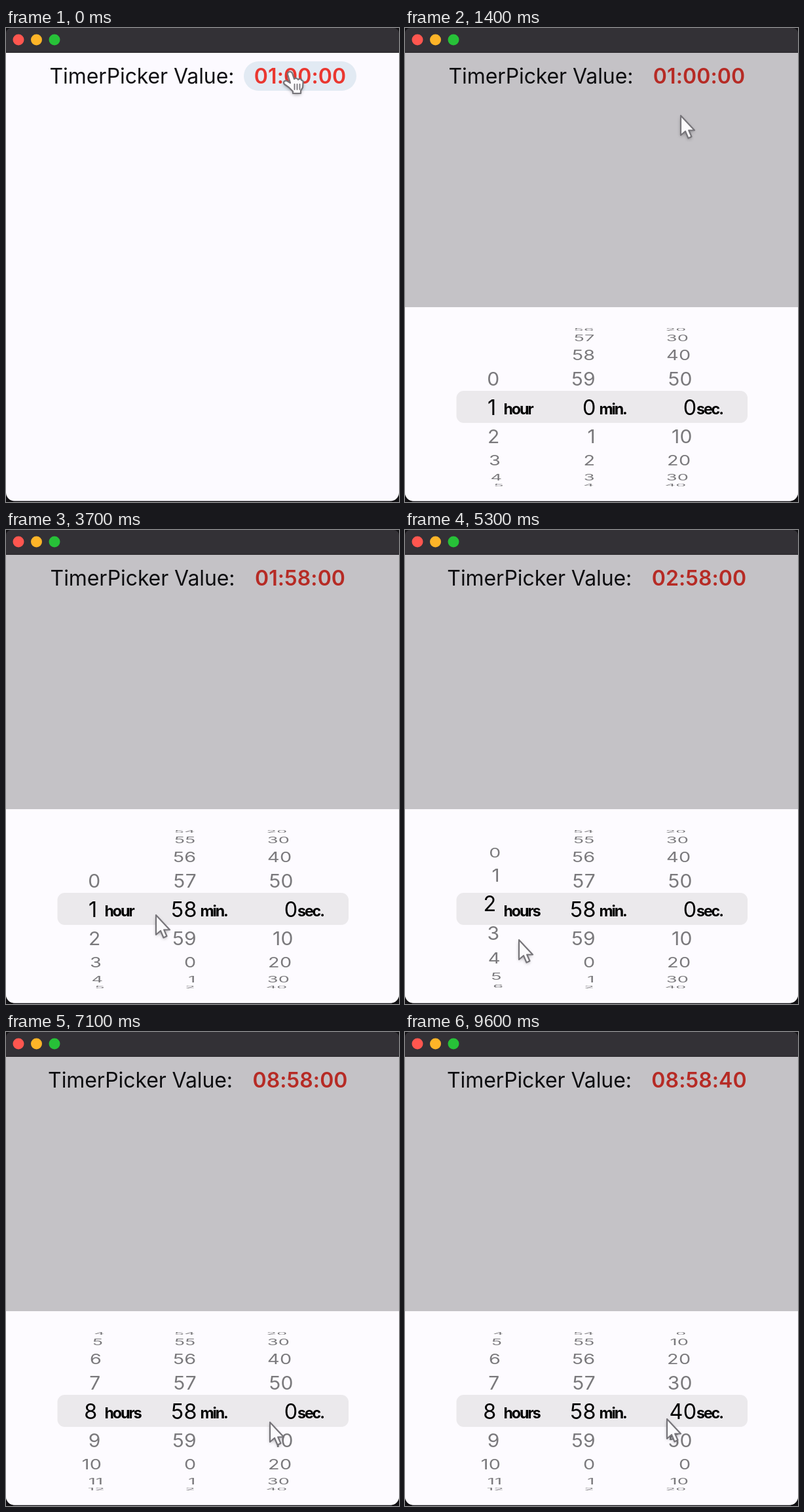
These frames come from a looping animation (600x725 px, 9.7 s). An HTML page with a canvas:

```html
<!DOCTYPE html>
<html lang="en">
<head>
<meta charset="utf-8">
<title>Timer picker</title>
<style>
html, body { margin: 0; width: 100%; height: 100%; overflow: hidden; background: #111; }
canvas { display: block; width: 600px; height: 725px; }
</style>
</head>
<body>
<canvas id="stage" width="600" height="725"></canvas>
<script>
const ctx = document.getElementById('stage').getContext('2d');
const FONT = 'Inter, Roboto, sans-serif';
const LOOP = 9700, STEP = 100;

// Tracks are lists of [time, value...] with eased segments.
const minuteTrack = [[2200, 0], [2600, -1], [2900, -1], [3400, -2]];
const hourTrack = [[4200, 1], [4600, 2], [5200, 2], [5400, 2.4], [6600, 8]];
const secondTrack = [[7700, 0], [7900, 0.5], [8200, 1], [8400, 1], [8700, 2], [8900, 2], [9400, 4]];
const pointerTrack = [
  [0, 434, 68], [600, 430, 81], [800, 430, 81], [1200, 421, 134], [1500, 421, 134],
  [2100, 232, 592], [3700, 229, 589], [4200, 174, 627], [6600, 174, 627],
  [7100, 403, 597], [7500, 400, 592]
];

// Wheel geometry: cylinder radius, angle per row, perspective, zoom of the middle band.
const RADIUS = 157.5, ANGLE = 0.2864, DEPTH = 0.347, ZOOM = 34 / 32;
const MID = 580.5;
const BAND = { x: 78.5, y: 555, w: 444.5, h: 49 };
const wheels = [
  { edge: 142.5, lean: 42, pivot: 215, x0: 60, x1: 215,
    label: n => n < 0 || n > 23 ? '' : String(n) },
  { edge: 289.6, lean: -12, pivot: 280, x0: 215, x1: 345,
    label: n => String(mod(n, 60)) },
  { edge: 438, lean: -58, pivot: 345, x0: 345, x1: 530,
    label: n => String(mod(n, 6) * 10) }
];

function mod(n, m) { return ((n % m) + m) % m; }
function clamp(v) { return Math.min(1, Math.max(0, v)); }
function smooth(p) { return p * p * (3 - 2 * p); }

function sample(track, t) {
  if (t <= track[0][0]) return track[0].slice(1);
  for (let i = 1; i < track.length; i++) {
    const a = track[i - 1], b = track[i];
    if (t <= b[0]) {
      const p = smooth((t - a[0]) / (b[0] - a[0]));
      return a.slice(1).map((v, k) => v + (b[k + 1] - v) * p);
    }
  }
  return track[track.length - 1].slice(1);
}

function box(x, y, w, h, r, fill) {
  ctx.beginPath();
  ctx.roundRect(x, y, w, h, r);
  ctx.fillStyle = fill;
  ctx.fill();
}

function write(str, x, y, size, weight, color, spacing, align = 'left') {
  ctx.font = `${weight} ${size}px ${FONT}`;
  ctx.letterSpacing = spacing + 'px';
  ctx.textAlign = align;
  ctx.textBaseline = 'alphabetic';
  ctx.fillStyle = color;
  ctx.fillText(str, x, y);
}

function drawRows(wheel, pos, color) {
  for (let n = Math.round(pos) - 5; n <= Math.round(pos) + 5; n++) {
    const a = (n - pos) * ANGLE;
    if (Math.abs(a) > 1.22) continue;
    const sin = Math.sin(a), cos = Math.cos(a);
    const w = 1 + DEPTH * (1 - cos);
    const squash = (cos * w - DEPTH * sin * sin) / (w * w);
    ctx.save();
    ctx.translate(wheel.edge + wheel.lean * (1 - 1 / w), MID + RADIUS * sin / w);
    ctx.scale(1 / w, squash);
    write(wheel.label(n), 1.5, 11.2, 30.4, 400, color, 0.3, 'right');
    ctx.restore();
  }
}

function drawWheel(wheel, pos) {
  const width = wheel.x1 - wheel.x0;
  ctx.save();
  ctx.beginPath();
  ctx.rect(wheel.x0, 427, width, BAND.y - 427);
  ctx.rect(wheel.x0, BAND.y + BAND.h, width, 120);
  ctx.clip();
  drawRows(wheel, pos, '#7a797c');
  ctx.restore();

  ctx.save();
  ctx.beginPath();
  ctx.rect(wheel.x0, BAND.y, width, BAND.h);
  ctx.clip();
  ctx.translate(wheel.pivot, MID);
  ctx.scale(ZOOM, ZOOM);
  ctx.translate(-wheel.pivot, -MID);
  drawRows(wheel, pos, '#000');
  ctx.restore();
}

function drawHeader(value, hover) {
  ctx.font = `600 32px ${FONT}`;
  ctx.letterSpacing = '0.1px';
  const shift = (ctx.measureText(value).width - ctx.measureText('01:00:00').width) / 2;
  if (hover) box(363, 51, 172, 45, 22.5, '#e2eaf3');
  write('TimerPicker Value:', 66.5 - shift, 85.3, 32, 400, '#111114', -0.1);
  write(value, 449, 85.3, 32, 600, '#ea3730', 0.1, 'center');
}

function drawSheet(offset, positions) {
  ctx.save();
  ctx.translate(0, offset);
  ctx.fillStyle = '#fdfbff';
  ctx.fillRect(0, 427, 600, 300);
  box(BAND.x, BAND.y, BAND.w, BAND.h, 11, '#ebe9ec');
  wheels.forEach((wheel, i) => drawWheel(wheel, positions[i]));
  const units = [Math.round(positions[0]) === 1 ? 'hour' : 'hours', 'min.', 'sec.'];
  [150.5, 296.5, 445].forEach((x, i) => write(units[i], x, 590.5, 23.2, 700, '#000', -2.1));
  ctx.restore();
}

function drawWindowBar() {
  ctx.fillStyle = '#333136';
  ctx.fillRect(0, 0, 600, 38);
  ctx.fillStyle = '#29272b';
  ctx.fillRect(0, 37, 600, 1);
  ['#ff564f', '#fdb428', '#27c138'].forEach((color, i) => {
    ctx.beginPath();
    ctx.arc(19 + 27.5 * i, 18, 8.5, 0, Math.PI * 2);
    ctx.fillStyle = color;
    ctx.fill();
  });
}

const arrow = new Path2D('M0 0V30L7 24L11.5 34.5L16.5 32.3L12.2 22.5H21Z');
const hand = new Path2D('M-4 3C-5-1 1-3 3 1L6 10C8 8 11 9 12 11C14 9 17 10 17 12' +
  'C19 12 20 13 19.5 16L19 23L16 28V32H4V29L-2 23L-9 18C-12 14-8 12-5 13L0 16Z');
const fingers = new Path2D('M6.5 18V26M10.5 18V26M14.5 18V26');

function drawPointer(x, y, isHand) {
  ctx.save();
  ctx.translate(x, y);
  ctx.lineJoin = ctx.lineCap = 'round';
  ctx.shadowColor = 'rgba(0,0,0,.35)';
  ctx.shadowBlur = 5;
  ctx.shadowOffsetY = 2;
  const shape = isHand ? hand : arrow;
  ctx.fillStyle = '#fbfafc';
  ctx.fill(shape);
  ctx.shadowColor = 'transparent';
  ctx.strokeStyle = '#77757a';
  ctx.lineWidth = 2.2;
  ctx.stroke(shape);
  if (isHand) {
    ctx.lineWidth = 1.8;
    ctx.stroke(fingers);
  }
  ctx.restore();
}

function draw(t) {
  const positions = [hourTrack, minuteTrack, secondTrack].map(track => sample(track, t)[0]);
  const [h, m, s] = positions.map(Math.round);
  const value = [h, mod(m, 60), mod(s, 6) * 10].map(n => String(n).padStart(2, '0')).join(':');
  const open = 1 - Math.pow(1 - clamp((t - 750) / 350), 3);
  const [px, py] = sample(pointerTrack, t);

  ctx.fillStyle = '#111013';
  ctx.fillRect(0, 0, 600, 725);
  ctx.save();
  ctx.beginPath();
  ctx.roundRect(0, 0, 600, 723.5, [8, 8, 13, 13]);
  ctx.clip();
  ctx.fillStyle = '#fcfaff';
  ctx.fillRect(0, 38, 600, 687);
  drawHeader(value, t < 900);
  ctx.fillStyle = `rgba(0,0,0,${0.225 * open})`;
  ctx.fillRect(0, 38, 600, 687);
  if (open > 0) drawSheet(300 * (1 - open), positions);
  drawWindowBar();
  ctx.restore();
  drawPointer(px, py, t < 900);
}

const start = performance.now();
function tick() {
  const t = (performance.now() - start) % LOOP;
  draw(Math.floor(t / STEP) * STEP);
  requestAnimationFrame(tick);
}
tick();
</script>
</body>
</html>
```
